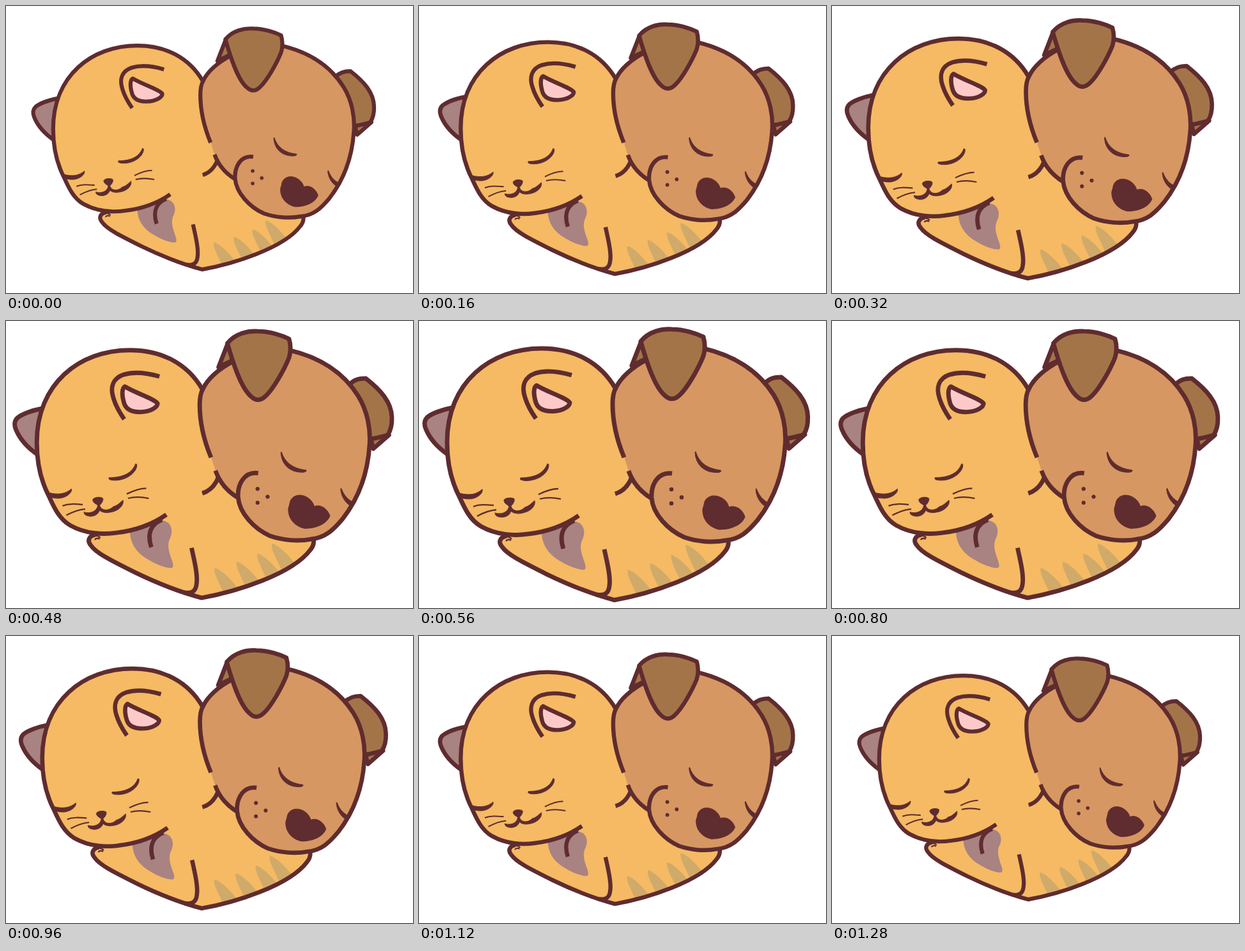
An HTML page for the animation above (1.36 s loop, 637 by 450 pixels).

```html
<!DOCTYPE html>
<html lang="en">
<head>
<meta charset="utf-8">
<title>Cuddling cat and dog</title>
<style>
  html, body { margin: 0; width: 100%; height: 100%; overflow: hidden; background: #fff; }
  svg { display: block; }
  .line { fill: none; stroke: #5f2c2f; stroke-width: 7; stroke-linejoin: round; }
  .thin { stroke-width: 2.3; }
  .dark { fill: #5f2c2f; stroke: #5f2c2f; stroke-width: 1; }
  .cat { fill: #f5ba63; }
  .dog { fill: #d79762; }
  .brown { fill: #a47449; }
  .mauve { fill: #a98282; }
  .pink { fill: #fdcac9; }
  .stripe { fill: #d0aa6a; }
</style>
</head>
<body>
<svg width="637" height="450" viewBox="0 0 637 450">
  <defs>
    <path id="body" d="M135 337C126 339 124 347 130 354C138 366 160 377 200 397C235 414 270 428 306 437.500C360 428 450 400 479 361C484 355 485 350 484 344L400 300L330 150L307 105L250 200L150 320Z"/>
    <clipPath id="belly"><use href="#body"/></clipPath>
    <path id="mark" d="M327 390C324 398 335 415 342 432L366 426C352 405 334 391 327 390Z"/>
  </defs>
  <g id="pets">
    <!-- shared body -->
    <use href="#body" class="cat"/>
    <g class="stripe" clip-path="url(#belly)">
      <use href="#mark"/>
      <use href="#mark" x="35" y="-10"/>
      <use href="#mark" x="68" y="-23"/>
      <use href="#mark" x="91" y="-39"/>
    </g>
    <path class="mauve" d="M192 330C192 350 202 366 222 377C237 386 250 390 258 390C262 389 261 384 259 378C253 362 251 352 256 342C260 333 259 324 253 318C246 313 236 312 225 314Z"/>
    <path class="line" d="M137 337C126 339 124 347 130 354C138 366 160 377 200 397C235 414 270 428 306 437.500C360 428 450 400 479 361C484 355 485 350 484 344"/>
    <path class="line" d="M243 313C228 319 218 332 226 357M290 358C295 380 300 402 298 415C297 428 289 431 278 429M333 245C327 260 317 268 307 271"/>
    <path class="line thin" d="M129 345C132 338 140 336 145 342M136 345Q139 341 144 344"/>

    <!-- cat -->
    <path class="line mauve" d="M52 136C36 139 20 145 13 151C8 156 8 163 11 170C18 187 30 199 46 210"/>
    <path class="line cat" d="M307 105C283 64 242 43 192 43C112 43 44 96 44 190C44 222 50 250 63 275C72 295 80 312 97 322C122 336 150 337 170 334C205 330 230 319 250 305"/>
    <path class="line" d="M239 85C215 78 195 78 182 82C165 88 160 102 166 120C170 133 176 143 183 153"/>
    <path class="line pink" d="M184 101C179 104 179 115 183 128C186 137 195 142 210 141.500C225 141 236 134 236 128C232 121 200 111 184 101Z"/>
    <g class="dark">
      <path d="M201 224C196 238 182 246 159 246C156 250 166 251 174 250C190 248 204 236 203 225Z"/>
      <path d="M63 270C78 274 90 272 99 264C101 270 90 279 78 279C70 279 65 277 62 275Z"/>
      <path d="M133 281C135 277 145 276 149 279C150 283 147 287 144 290C146 299 158 300 166 292C172 291 177 285 181 282C183 290 174 299 162 301C153 303 147 301 144 298C141 306 133 309 125 307C121 306 119 304 119 301C129 304 140 300 141 290C138 288 133 286 133 281Z"/>
    </g>
    <path class="line thin" d="M85 291C95 287 105 288 117 289M91 306C100 301 110 297 121 296M187 272C197 267 207 263 218 263M189 279C200 276 212 277 222 279"/>

    <!-- dog -->
    <path class="line brown" d="M541 98C548 90 556 88 567 88C590 106 608 125 608.500 150C609 165 606 172 602 178C594 183 584 184 572 184"/>
    <path class="line brown" d="M604 178L579 200L575 185Z"/>
    <path class="line brown" d="M347 34L333 70L358 58Z"/>
    <path class="dog" d="M321 213C309 185 303 160 303 130C303 118 305 110 308 105C315 90 332 73 358 60L447 44C492 54 530 76 555 116C570 140 575 170 573 195C570 240 555 280 530 312C515 330 502 342 480 344C460 348 435 346 415 339C390 328 366 303 364 277C345 267 334 252 328 235Z"/>
    <path class="line" d="M321 214C309 185 303 160 303 130C303 118 305 110 308 105C315 90 332 73 358 60M445 43C492 54 530 76 555 116C570 140 575 170 573 195C570 240 555 280 530 312C515 330 502 342 480 344C460 348 435 346 415 339C390 328 366 303 364 277C363 255 375 236 396 239M328 235C334 252 345 267 365 279"/>
    <path class="line brown" d="M347 32C360 16 380 12 396 13C415 13 435 20 445 25C448 35 448 45 445 55C437 75 420 105 408 116C400 124 392 124 385 117C368 103 355 60 347 32Z"/>
    <g class="dark">
      <path d="M433 205C438 222 452 232 472 234C474 236 470 238 464 237.500C446 237 433 225 432 206Z"/>
      <path d="M528 263C533 276 539 281 548 286L544 292C534 286 528 276 527 264Z"/>
      <path d="M446 288C447 276 460 270 473 277C480 281 484 287 485 292C495 288 506 295 510 307C505 320 488 327 470 327C455 324 443 312 444 295Z"/>
      <circle cx="395" cy="264" r="2.800"/>
      <circle cx="411" cy="276.500" r="2.800"/>
      <circle cx="395" cy="286" r="2.800"/>
    </g>
  </g>
</svg>
<script>
  const STEP_MS = 80, STEPS = 17, PEAK = 8;
  const CENTER = [314, 216];
  const GROWTH = 0.142, DRAWN_SCALE = 1.124;
  const pets = document.getElementById('pets');

  // Linear pulse in discrete steps: small, large, small.
  function draw(time) {
    const step = Math.floor(time / STEP_MS) % STEPS;
    const size = 1 - Math.abs(PEAK - step) / PEAK;
    const scale = (1 + GROWTH * size) / DRAWN_SCALE;
    const [x, y] = CENTER;
    pets.setAttribute('transform', `translate(${x} ${y}) scale(${scale}) translate(${-x} ${-y})`);
  }

  function tick() {
    draw(performance.now());
    requestAnimationFrame(tick);
  }
  tick();
</script>
</body>
</html>
```
